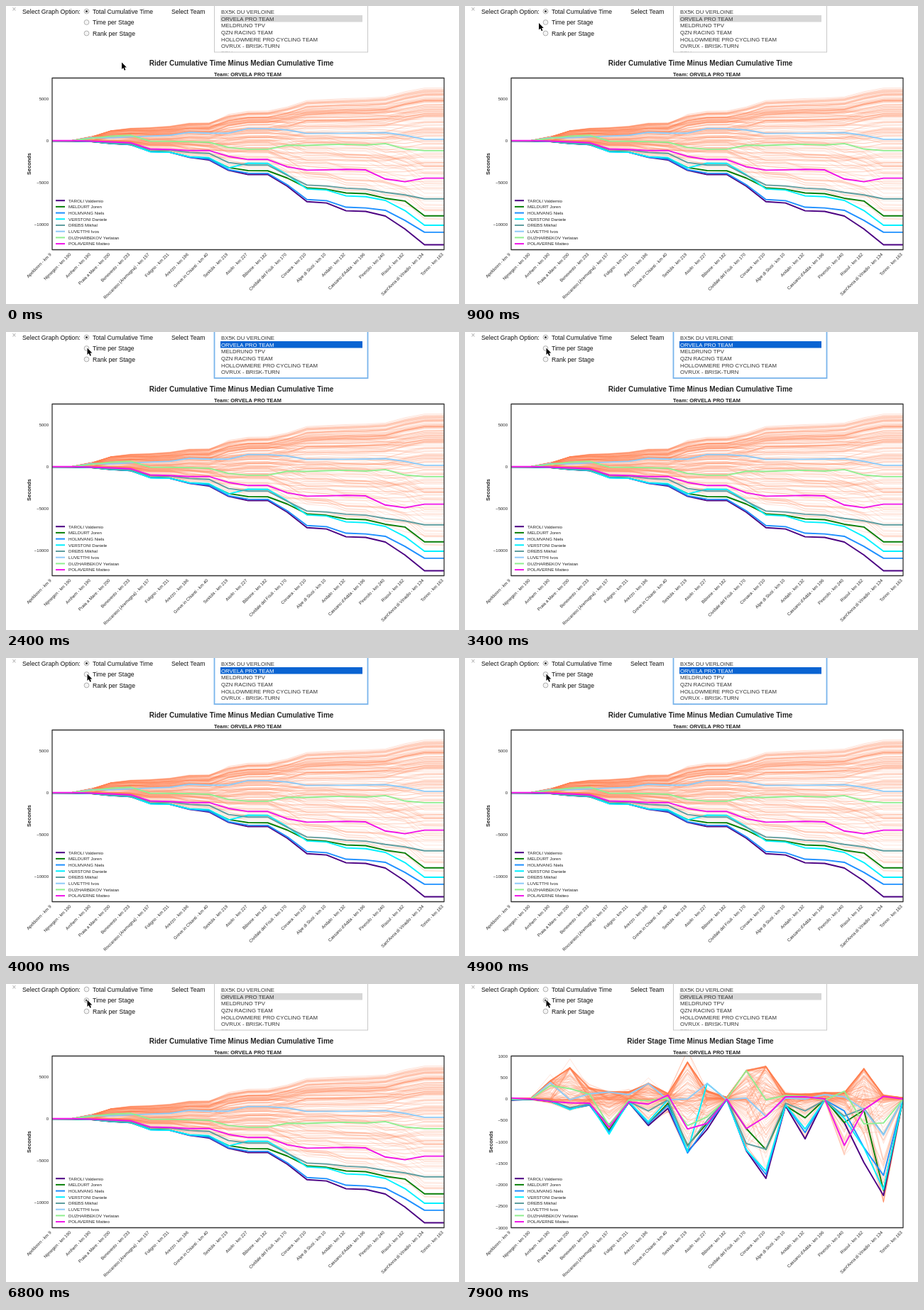
These frames come from a looping animation (638x420 px, 8000 ms). An HTML page with a canvas:

```html
<!DOCTYPE html>
<html lang="en">
<head>
<meta charset="utf-8">
<title>Rider time chart</title>
<style>
  html, body { margin: 0; width: 100%; height: 100%; overflow: hidden; background: #fff; }
  canvas { display: block; }
</style>
</head>
<body>
<canvas id="stage" width="638" height="420"></canvas>
<script>
const W = 638, H = 420, LOOP = 8000;
const FONT = '"Liberation Sans", Arial, sans-serif';
const BOX = { x: 65, y: 101.5, w: 552, h: 242 };
const STEP = BOX.w / 20;
const TEAM = 'ORVELA PRO TEAM';

const TEAMS = ['BX5K DU VERLOINE', TEAM, 'MELDRUNO TPV', 'QZN RACING TEAM',
  'HOLLOWMERE PRO CYCLING TEAM', 'OVRUX - BRISK-TURN', 'EPU'];
const OPTIONS = ['Total Cumulative Time', 'Time per Stage', 'Rank per Stage'];
const STAGES = ['Apeldoorn - km 9', 'Nijmegen - km 190', 'Arnhem - km 190', 'Praia a Mare - km 200',
  'Benevento - km 233', 'Roccaraso (Aremogna) - km 157', 'Foligno - km 211', 'Arezzo - km 186',
  'Greve in Chianti - km 40', 'Sestola - km 219', 'Asolo - km 227', 'Bibione - km 182',
  'Cividale del Friuli - km 170', 'Corvara - km 210', 'Alpe di Siusi - km 10', 'Andalo - km 132',
  "Cassano d'Adda - km 196", 'Pinerolo - km 240', 'Risoul - km 162',
  "Sant'Anna di Vinadio - km 134", 'Torino - km 163'];

// Gap to the stage median, in tens of seconds.
const rider = (name, color, ...gaps) => ({ name, color, gaps });
const RIDERS = [
  rider('TAROLI Valdemio', '#4b0082', -3, -1, -5, -23, -12, -76, -8, -62, -22, -123, -71, 0, -121, -185, -16, -93, 0, -55, -148, -225, 0),
  rider('MELDURT Joren', '#0a800a', -2, 0, -6, -23, -14, -73, -8, -58, -10, -108, -57, -2, -69, -118, -16, -44, -1, -55, -26, -213, 0),
  rider('HOLMVANG Niels', '#1e90ff', -2, 0, -5, -23, -14, -77, -8, -58, -15, -126, -62, -2, -118, -176, -14, -78, -2, -28, -113, -178, 0),
  rider('VERSTONI Daniele', '#00f0ff', -1, 0, -5, -25, -10, -82, -6, -53, -2, -122, 36, -2, -119, -168, -14, -70, -2, -45, -114, -211, 0),
  rider('DREBS Mikhal', '#5f9ea0', -1, 0, -4, -20, -12, -60, -6, -28, -2, -110, -50, 0, -104, -117, -10, -28, -3, -40, -22, -83, 0),
  rider('LUVETTHI Ivos', '#8ecbf8', 0, 0, 38, -2, 12, 16, 10, 36, -2, 0, 36, -2, 2, -41, 2, 0, 10, 5, -25, -84, 0),
  rider('DUZHARBEKOV Yerlatan', '#90ee90', 0, 0, 31, 24, 11, -62, -2, -4, 2, -62, -42, 0, 66, -2, 8, 6, -3, 18, -58, -56, 0),
  rider('POLAVERNE Matteo', '#f012e8', 2, 0, -6, -9, -10, -66, -7, -12, 9, -70, -57, 0, -69, -41, 5, 5, 0, -108, -25, 6, 0)
];

// The overall median moves differently from the sum of stage medians.
const DRIFT = { 5: -8, 8: -9, 10: 20, 12: -18, 16: -7, 18: -7, 19: 36 };
const SLOW = [2, 2, 42, 72, 25, 16, 16, 36, 12, 85, 18, 4, 66, 75, 12, 10, 14, 14, 70, 8, 3];
const FAST = [-2, -2, -8, -25, -15, -70, -10, -60, -30, -125, -70, -3, -110, -170, -20, -90, -5, -130, -80, -240, -4];

function random(seed) {
  return () => {
    seed = (seed + 0x6D2B79F5) | 0;
    let t = Math.imul(seed ^ (seed >>> 15), 1 | seed);
    t = (t + Math.imul(t ^ (t >>> 7), 61 | t)) ^ t;
    return ((t ^ (t >>> 14)) >>> 0) / 4294967296;
  };
}

function makeField(count) {
  const rnd = random(21);
  return Array.from({ length: count }, () => {
    const form = Math.pow(rnd(), 0.8);
    return SLOW.map((slow, i) => {
      const u = Math.min(1, Math.max(0, form + (rnd() - 0.5) * 0.7));
      const jitter = (rnd() - 0.5) * 4 * (slow > 5);
      if (u < 0.5) return FAST[i] * Math.pow(1 - 2 * u, 1.8) + jitter;
      const stray = rnd() < 0.02 ? 1.35 : 1;
      return slow * stray * Math.min(1, (u - 0.5) * 4) + jitter;
    });
  });
}
const FIELD = makeField(165);

function cumulate(gaps) {
  let sum = 0;
  return gaps.map((g, i) => sum += g + (DRIFT[i] || 0));
}

const CHARTS = [
  { title: 'Rider Cumulative Time Minus Median Cumulative Time', zero: 190, unit: 59 / 500,
    ticks: [5000, 0, -5000, -10000], labelX: 34.5, data: cumulate },
  { title: 'Rider Stage Time Minus Median Stage Time', zero: 162, unit: 60.5 / 100,
    ticks: [1000, 500, 0, -500, -1000, -1500, -2000, -2500, -3000], labelX: 38.5, data: g => g }
];

function text(c, str, x, y, size, { align = 'left', color = '#222', bold = false, base = 'alphabetic', turn = 0 } = {}) {
  c.save();
  c.translate(x, y);
  c.rotate(turn);
  c.font = `${bold ? 'bold ' : ''}${size}px ${FONT}`;
  c.textAlign = align;
  c.textBaseline = base;
  c.fillStyle = color;
  c.fillText(str, 0, 0);
  c.restore();
}

function plot(c, values, chart, color, width) {
  c.beginPath();
  values.forEach((v, i) => c.lineTo(BOX.x + i * STEP, chart.zero - v * chart.unit));
  c.strokeStyle = color;
  c.lineWidth = width;
  c.stroke();
}

function renderChart(chart) {
  const layer = document.createElement('canvas');
  layer.width = W;
  layer.height = H;
  const c = layer.getContext('2d');
  c.lineJoin = 'round';

  c.save();
  c.beginPath();
  c.rect(BOX.x, BOX.y, BOX.w, BOX.h);
  c.clip();
  for (const gaps of FIELD) plot(c, chart.data(gaps), chart, 'rgba(255,127,80,0.24)', 0.9);
  for (const r of RIDERS) plot(c, chart.data(r.gaps), chart, r.color, 1.9);
  c.restore();

  c.strokeStyle = '#333';
  c.lineWidth = 1.3;
  c.strokeRect(BOX.x, BOX.y, BOX.w, BOX.h);

  text(c, chart.title, 331.5, 84, 10, { align: 'center', bold: true });
  text(c, 'Team: ' + TEAM, 340.5, 99, 7.4, { align: 'center', bold: true });
  text(c, 'Seconds', chart.labelX, 222.5, 7.4, { align: 'center', bold: true, turn: -Math.PI / 2 });
  for (const t of chart.ticks) {
    const label = String(t).replace('-', '\u2212');
    text(c, label, 60, chart.zero - t / 10 * chart.unit + 2.2, 6, { align: 'right' });
  }
  STAGES.forEach((s, i) =>
    text(c, s, BOX.x + i * STEP - 2, 349.5, 6.1, { align: 'right', base: 'middle', turn: -Math.PI / 4 }));
  RIDERS.forEach((r, i) => {
    const y = 274.2 + i * 8.7;
    c.fillStyle = r.color;
    c.fillRect(70, y - 1, 13, 2);
    text(c, r.name, 88, y + 2.3, 6.2);
  });
  return layer;
}

const ctx = document.getElementById('stage').getContext('2d');
const layers = CHARTS.map(renderChart);

function drawOptions(selected) {
  text(ctx, '\u00d7', 11.5, 7.5, 10, { align: 'center', color: '#aaa' });
  text(ctx, 'Select Graph Option:', 23, 11, 8.75, { color: '#111' });
  text(ctx, 'Select Team', 233, 11, 8.65, { color: '#111' });
  OPTIONS.forEach((label, i) => {
    const y = 7.5 + i * 15.5;
    ctx.beginPath();
    ctx.arc(113.5, y, 3.4, 0, 7);
    ctx.fillStyle = '#f4f4f4';
    ctx.fill();
    ctx.strokeStyle = '#a8a8a8';
    ctx.lineWidth = 0.9;
    ctx.stroke();
    if (i === selected) {
      ctx.beginPath();
      ctx.arc(113.5, y, 1.5, 0, 7);
      ctx.fillStyle = '#333';
      ctx.fill();
    }
    text(ctx, label, 122, y + 3, 8.65, { color: '#111' });
  });
}

function drawList(focused) {
  ctx.save();
  ctx.beginPath();
  ctx.rect(294, 0, 215, 64.5);
  ctx.clip();
  ctx.fillStyle = focused ? '#0a64d2' : '#d6d6d6';
  ctx.fillRect(302, 13, 200, 9.5);
  TEAMS.forEach((name, i) =>
    text(ctx, name, 303, 10.8 + i * 9.72, 7.8, { color: focused && i === 1 ? '#fff' : '#333' }));
  ctx.restore();
  ctx.strokeStyle = focused ? '#79b4ec' : '#c8c8c8';
  ctx.lineWidth = focused ? 1.8 : 1;
  ctx.strokeRect(293.5, -4, 216, 69);
}

function drawRing(age) {
  if (age < 0 || age >= 300) return;
  ctx.beginPath();
  ctx.arc(115, 23.5, 13 + 2 * Math.min(1, age / 150), 0, 7);
  ctx.fillStyle = 'rgba(255,255,255,0.4)';
  ctx.fill();
  ctx.strokeStyle = '#000';
  ctx.lineWidth = 2;
  ctx.stroke();
}

const PATH = [[100, 163, 79.5], [500, 112, 33], [700, 112, 33], [900, 104, 24], [1500, 114.5, 22.5]];

function cursorAt(t) {
  if (t <= PATH[0][0]) return PATH[0].slice(1);
  for (let i = 1; i < PATH.length; i++) {
    const [t0, x0, y0] = PATH[i - 1], [t1, x1, y1] = PATH[i];
    if (t > t1) continue;
    const p = (t - t0) / (t1 - t0), e = p * p * (3 - 2 * p);
    return [x0 + (x1 - x0) * e, y0 + (y1 - y0) * e];
  }
  return PATH[PATH.length - 1].slice(1);
}

function drawCursor([x, y]) {
  const arrow = new Path2D('M0 0V9.6L2.2 7.6L3.8 11.2L5.4 10.5L3.9 7H6.8Z');
  ctx.save();
  ctx.translate(x, y);
  ctx.strokeStyle = '#fff';
  ctx.lineWidth = 1.4;
  ctx.stroke(arrow);
  ctx.fillStyle = '#000';
  ctx.fill(arrow);
  ctx.restore();
}

function draw(t) {
  ctx.fillStyle = '#fff';
  ctx.fillRect(0, 0, W, H);
  const switched = t >= 5500;
  drawOptions(switched ? 1 : 0);
  drawList(t >= 2100 && !switched);
  ctx.drawImage(layers[t >= 7900 ? 1 : 0], 0, 0);
  drawRing(t - 1800);
  drawRing(t - 5300);
  drawCursor(cursorAt(t));
}

const start = performance.now();
function tick() {
  draw((performance.now() - start) % LOOP);
  requestAnimationFrame(tick);
}
tick();
</script>
</body>
</html>
```
